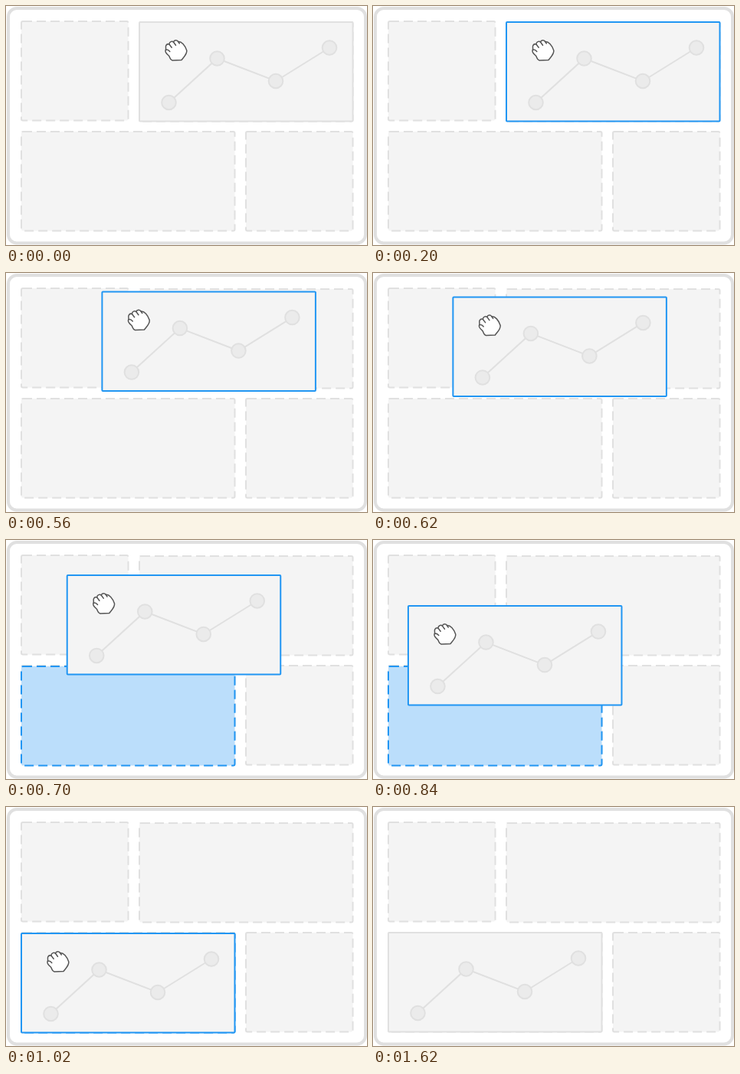
These frames come from a looping animation (471x312 px, 2.3 s). An HTML page:

```html
<!DOCTYPE html>
<html lang="en">
<head>
<meta charset="utf-8">
<title>Drag a widget</title>
<style>
  html, body { margin: 0; width: 100%; height: 100%; overflow: hidden; background: #fff; }
  svg { display: block; width: 471px; height: 312px; }
  rect, path, circle { stroke: #e0e0e0; stroke-width: 2; }
  .frame { fill: #fff; stroke-width: 4; }
  .slot, .box { fill: #f4f4f4; }
  .slot { stroke-dasharray: 12 6; }
  .line { fill: none; }
  circle { fill: #ebebeb; }
  .hot { fill: #bbdefb; }
  .hot, .drag .box { stroke: #2196f3; }
  .hand path { fill: #fff; stroke: #555; stroke-width: 1.5; stroke-linecap: round; stroke-linejoin: round; }
  .hand .fold { fill: none; }
</style>
</head>
<body>
<svg viewBox="0 0 471 312">
  <rect class="frame" x="3" y="3" width="466" height="306.5" rx="11"/>
  <rect class="slot" x="20" y="20" width="139.5" height="129.5" rx="2"/>
  <rect class="slot" x="174" y="21" width="278.5" height="129.5" rx="2"/>
  <rect class="slot" x="20" y="164" width="278.5" height="129.5" rx="2"/>
  <rect class="slot" x="313" y="164" width="139.5" height="129.5" rx="2"/>
  <rect class="slot hot" id="target" x="20" y="165" width="278.5" height="129.5" rx="2"/>
  <g id="card">
    <rect class="box" x="174" y="21" width="278.5" height="129.5" rx="1"/>
    <path class="line" d="M212.5 126 275.5 68.5 352 98 422 54.5"/>
    <circle cx="212.5" cy="126" r="9.3"/>
    <circle cx="275.5" cy="68.5" r="9.3"/>
    <circle cx="352" cy="98" r="9.3"/>
    <circle cx="422" cy="54.5" r="9.3"/>
    <g class="hand" id="hand">
      <path d="M212.5 65C209 62 207 59.5 208.4 57.3C209.2 56 207.8 53.5 208.8 51.5C210 49.5 212 49.5 213 50C213 46.5 216.5 45.5 218.5 47C219.5 44 223 44 224.5 46.4C229 46 233.5 51 235.8 58C236.4 63 231.5 67 229 70.5L217 71C213.5 70 214.5 67.5 212.5 65Z"/>
      <path class="fold" d="M213 50l3.2 4.2M218.5 47l3 4.2M224.5 46.4l1.8 2.6M208.4 57.3q3-1 5.4 2.2"/>
    </g>
  </g>
</svg>
<script>
  const LOOP = 2300, STEP = 20;
  const GRAB = 200, START = 440, HOVER = 640, END = 1020, DROP = 1620;
  const card = document.getElementById('card');
  const hand = document.getElementById('hand');
  const target = document.getElementById('target');

  // Quadratic curve from 0 through control c to end e
  const curve = (u, c, e) => 2 * u * (1 - u) * c + u * u * e;
  const show = (el, on) => el.setAttribute('visibility', on ? 'visible' : 'hidden');

  function draw(now) {
    const t = Math.floor((now % LOOP + 0.01) / STEP) * STEP;
    const u = Math.min(1, Math.max(0, (t - START) / (END - START)));
    const dropped = t >= DROP;
    const x = curve(u, -128, -154);
    const y = dropped ? 143 : curve(u, -8, 144);

    card.setAttribute('transform', `translate(${x.toFixed(2)} ${y.toFixed(2)})`);
    card.classList.toggle('drag', t >= GRAB && !dropped);
    show(hand, !dropped);
    show(target, t >= HOVER && !dropped);
    requestAnimationFrame(draw);
  }
  draw(performance.now());
</script>
</body>
</html>
```
